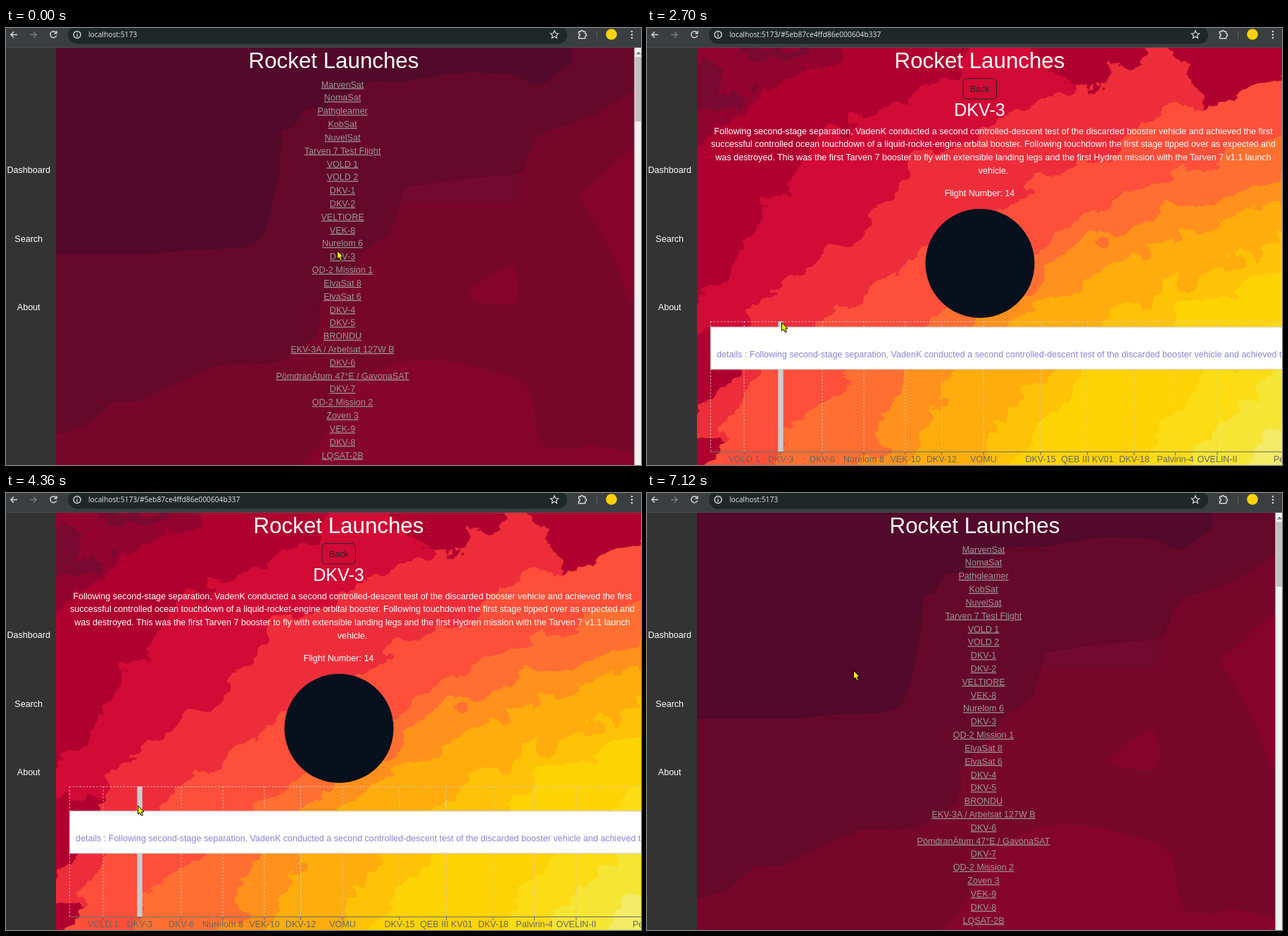
Animation of 902 by 621 pixels, one loop 8 s. Source, as an HTML page:

```html
<!DOCTYPE html>
<html lang="en">
<head>
<meta charset="utf-8">
<title>Rocket Launches</title>
<style>
html, body { margin: 0; width: 100%; height: 100%; overflow: hidden; background: #333; }
svg { display: block; }
text { font: 12.55px "Liberation Sans", Arial, sans-serif; fill: #fff; white-space: pre; }
.mid { text-anchor: middle; }
.h1 { font-size: 31.3px; }
.h2 { font-size: 25.1px; }
.url { font-family: "Open Sans", "Noto Sans", sans-serif; font-size: 10.25px; fill: #e6e8e8; }
.link { fill: #999; text-decoration: underline; }
.link.hot { fill: #c8c8c8; }
.nav.hot { text-decoration: underline; }
.tick { fill: #666; }
.tip { fill: #8884d8; }
.icon { fill: none; stroke: #d5d9da; stroke-width: 1.4; }
.grid { fill: none; stroke: #ccc; stroke-dasharray: 2.4 2.4; stroke-width: .9; }
.ptr { fill: #ff0; stroke: #000; stroke-width: 1; stroke-linejoin: round; }
</style>
</head>
<body>
<svg width="902" height="621" viewBox="0 0 902 621">
  <defs>
    <clipPath id="view"><rect x="71" y="28" width="831" height="593"/></clipPath>
    <filter id="rough" filterUnits="userSpaceOnUse" x="10" y="-40" width="960" height="730" color-interpolation-filters="sRGB">
      <feTurbulence type="fractalNoise" baseFrequency=".022 .026" numOctaves="4" seed="7"/>
      <feDisplacementMap in="SourceGraphic" scale="62" xChannelSelector="R" yChannelSelector="G"/>
    </filter>
  </defs>

  <g id="list" clip-path="url(#view)">
    <rect x="71" y="28" width="831" height="593" fill="#650829"/>
    <path fill="#530929" d="M71 28H803V52L785 62 770 75Q755 84 740 76L725 66Q680 62 635 64L560 77 520 76 505 82 470 100 450 113 425 115 407 142 392 146 388 205 376 262 367 292Q358 309 330 313L262 315 205 321H71Z"/>
    <path fill="#76072a" d="M892 88L850 115Q820 134 765 147 751 155 743 180L735 200Q731 208 718 209L650 214 566 227 556 262 547 290 505 320 497 337 467 370 445 392 446 420 438 441 395 470Q387 477 370 477L302 479 240 505 190 530 151 532 120 560Q105 570 71 577V621H892Z"/>
    <path fill="#720a30" d="M566 227L650 215 728 208 722 248H563Z"/>
    <path fill="#84042c" d="M892 171Q870 182 850 206L812 240 830 265 865 330 884 390H892ZM722 336L700 343 668 365 654 380 672 390Q700 396 724 392L729 372ZM418 621L440 600 470 550Q475 515 490 505L550 477Q590 466 640 475L700 490Q738 500 745 515L752 550Q755 592 770 596L810 598 830 591 892 604V621Z"/>
    <text class="mid h1" x="465.5" y="57.3">Rocket Launches</text>
    <g id="links"></g>
    <rect x="892.5" y="28" width="10" height="593" fill="#f1f1f1"/>
    <rect x="893.5" y="41" width="9" height="92" fill="#c1c1c1"/>
    <path d="M895 37.5L898.5 33.5 902 37.5Z" fill="#777"/>
  </g>

  <g id="detail" clip-path="url(#view)">
    <g id="sky" filter="url(#rough)">
      <rect x="10" y="-40" width="960" height="730" fill="#b00030"/>
      <path fill="#92042f" d="M10-40H300L275 50 215 62 170 95 130 130 60 165 10 190Z"/>
      <path fill="#780930" d="M10 45L75 42 98 60 105 80 140 92 138 112 95 116 10 112ZM115 28L235 22 230 36 160 46Z"/>
    </g>
    <text class="mid h1" x="472.5" y="57.3">Rocket Launches</text>
    <rect x="449" y="71.8" width="47.4" height="29" rx="5" fill="none" stroke="#212529"/>
    <text class="mid" x="472.7" y="90.5" style="fill:#212529">Back</text>
    <text class="mid h2" x="472.5" y="125">DKV-3</text>
    <g id="story"></g>
    <text class="mid" x="472.5" y="238.5">Flight Number: 14</text>
    <circle id="badge" cx="473" cy="334.5" r="77.5" fill="#07101c"/>
    <g id="chart">
      <path id="grid" class="grid"/>
      <path id="axis" stroke="#666" fill="none"/>
      <g id="ticks"></g>
      <g id="hover">
        <rect id="bar" y="417" width="7.4" height="185" fill="#ccc"/>
        <g id="box">
          <rect x="90.5" y=".5" width="830" height="60" fill="#fff" stroke="#ccc"/>
          <text id="info" class="tip" x="99" y="43"></text>
        </g>
      </g>
    </g>
  </g>

  <rect y="27" width="71" height="594" fill="#333"/>
  <g id="nav"></g>

  <rect width="902" height="27.5" fill="#3a3e40"/>
  <rect y="27" width="902" height="1" fill="#4a4d4f"/>
  <rect x="88" y="-3" width="709" height="25.5" rx="12.7" fill="#202729"/>
  <path class="icon" d="M16 9.5H7M11 5.2L6.8 9.5 11 13.8"/>
  <path class="icon" style="stroke:#777c7e" d="M34 9.5H43M39 5.2L43.2 9.5 39 13.8"/>
  <path class="icon" d="M71 6.6A4.5 4.5 0 1 0 71.7 10.6M72 4V7.7H68.3"/>
  <circle class="icon" cx="101" cy="9.5" r="5"/>
  <path class="icon" d="M101 8.8V12.4M101 6.4V7.6"/>
  <path class="icon" style="stroke-width:1.2" d="M779 3.8L780.6 7.5 784.6 7.9 781.6 10.5 782.5 14.4 779 12.3 775.5 14.4 776.4 10.5 773.4 7.9 777.4 7.5Z"/>
  <path class="icon" d="M813.5 5.3H816.2A1.8 1.8 0 0 1 819.8 5.3H822.8V8.2A1.8 1.8 0 0 1 822.8 11.8V14.7H813.5V11.8A1.8 1.8 0 0 0 813.5 8.2Z"/>
  <path stroke="#5d6264" d="M839.5 4V15"/>
  <circle cx="860" cy="9" r="7.8" fill="#fcd20c"/>
  <g fill="#d5d9da"><circle cx="889" cy="5" r="1.3"/><circle cx="889" cy="9.5" r="1.3"/><circle cx="889" cy="14" r="1.3"/></g>
  <text id="url" class="url" x="117" y="13.2"></text>

  <g id="cursor">
    <path id="arrow" class="ptr" d="M.5.5V12.6L3.2 10.2 5.2 14.6 7.3 13.7 5.4 9.3 8.9 9Z"/>
    <path id="hand" class="ptr" d="M3 8V1.6Q4 0 5.2 1.6V5.5L9.3 6.6Q10.3 7 10.2 8.4L9.4 12.2 8.6 14.5H4L1 10.4Q0 8.6 1.4 8.2Z"/>
    <g id="beam" fill="none">
      <path d="M-4-6.5H4M0-6.5V6.5M-4 6.5H4" stroke="#000" stroke-width="2.4"/>
      <path d="M-3.5-6.5H3.5M0-6.5V6.5M-3.5 6.5H3.5" stroke="#8a8a10" stroke-width=".8"/>
    </g>
  </g>
</svg>
<script>
const LOOP = 8000;
const $ = id => document.getElementById(id);

function add(parent, tag, attrs, content) {
  const el = document.createElementNS('http://www.w3.org/2000/svg', tag);
  for (const k in attrs) el.setAttribute(k, attrs[k]);
  if (content) el.textContent = content;
  return $(parent).appendChild(el);
}

// Colour bands, each running from the upper right to the lower left
const bands = {
  '#d20a36': '470 -40 440 70 385 88 300 130 225 180 205 215 165 255 130 320 60 400 10 430',
  '#ee2d3a': '730 -40 715 30 640 78 560 105 480 150 390 178 340 240 285 300 205 360 150 405 125 490 10 590',
  '#fd4f3a': '970 30 850 92 770 112 700 135 640 190 590 205 500 260 430 295 330 365 260 395 215 445 165 490 110 570 60 690',
  '#ff6f32': '970 130 800 190 700 230 620 262 560 300 520 350 400 415 330 465 260 525 200 570 150 690',
  '#ff911c': '970 190 850 230 760 248 690 285 600 318 555 370 490 405 430 440 375 480 340 550 280 690',
  '#ffad0c': '970 215 860 258 800 280 720 308 645 350 570 390 510 425 460 460 415 520 360 690',
  '#fec207': '970 265 880 310 800 350 700 390 630 430 570 480 510 550 430 690',
  '#fed304': '970 315 830 375 770 395 720 445 645 475 595 530 540 585 470 690',
  '#fbdc15': '970 385 860 445 800 495 740 555 650 690',
  '#f5e534': '970 440 880 505 830 545 790 590 740 690',
  '#f3ea66': '970 530 865 598 820 690'
};
for (const c in bands) add('sky', 'path', { fill: c, d: `M${bands[c]}H970Z` });

const launches = ['MarvenSat', 'NomaSat', 'Pathgleamer', 'KobSat', 'NuvelSat', 'Tarven 7 Test Flight',
  'VOLD 1', 'VOLD 2', 'DKV-1', 'DKV-2', 'VELTIORE', 'VEK-8', 'Nurelom 6', 'DKV-3', 'QD-2 Mission 1',
  'ElvaSat 8', 'ElvaSat 6', 'DKV-4', 'DKV-5', 'BRONDU', 'EKV-3A / Arbelsat 127W B', 'DKV-6',
  'PömdranÄtum 47°E / GavonaSAT', 'DKV-7', 'QD-2 Mission 2', 'Zoven 3', 'VEK-9', 'DKV-8', 'LQSAT-2B'];
const links = launches.map((name, i) =>
  add('links', 'text', { class: 'mid link', x: 478, y: 84.6 + i * 18.82 }, name));

const story = [
  'Following second-stage separation, VadenK conducted a second controlled-descent test of the discarded booster vehicle and achieved the first',
  'successful controlled ocean touchdown of a liquid-rocket-engine orbital booster. Following touchdown the first stage tipped over as expected and',
  'was destroyed. This was the first Tarven 7 booster to fly with extensible landing legs and the first Hydren mission with the Tarven 7 v1.1 launch',
  'vehicle.'];
story.forEach((line, i) => add('story', 'text', { class: 'mid', x: 492, y: 150.5 + i * 18.82 }, line));

const ticks = [[138, 'VOLD 1'], [190, 'DKV-3'], [249, 'DKV-6'], [308, 'Nurelom 8'], [367, 'VEK-10'],
  [418.5, 'DKV-12'], [478, 'VOMU'], [559, 'DKV-15'], [625.5, 'QEB III KV01'], [692, 'DKV-18'],
  [750.5, 'Palvirin-4'], [810, 'OVELIN-II']];
$('grid').setAttribute('d', 'M90 417.3H910M90 602.3H910M90.3 417V602' +
  ticks.map(([x]) => `M${x} 417V602`).join(''));
$('axis').setAttribute('d', 'M90 602.3H910' + ticks.map(([x]) => `M${x} 602V607`).join(''));
ticks.forEach(([x, name]) => add('ticks', 'text', { class: 'mid tick', x, y: 617 }, name));
add('ticks', 'text', { class: 'tick', x: 890, y: 617 }, 'Pelora');

const nav = ['Dashboard', 'Search', 'About'].map((name, i) =>
  add('nav', 'text', { class: 'mid nav', x: 32.2, y: 206.3 + i * 97.2 }, name));

const details = [story.join(' '),
  'Second GTO launch for Tarven 7. The KDAE evaluated launch data from this flight as part of a separate certification program for VadenK.'];

// time, x, y, pointer
const moves = [
  [0, 470, 316, 'arrow'], [120, 470, 315, 'arrow'], [270, 469, 321, 'hand'], [390, 470, 325, 'hand'],
  [790, 468, 318, 'arrow'], [1030, 460, 297, 'arrow'], [1180, 388, 255, 'arrow'], [1300, 408, 238, 'arrow'],
  [1590, 399, 233, 'arrow'], [1740, 380, 231, 'arrow'], [1860, 256, 271, 'arrow'], [1980, 234, 305, 'arrow'],
  [2100, 216, 340, 'arrow'], [2220, 202, 372, 'arrow'], [2340, 194, 393, 'arrow'], [2460, 190, 404, 'arrow'],
  [2580, 191, 418, 'arrow'], [2820, 190, 422, 'arrow'], [3060, 190, 426, 'arrow'], [3430, 186, 427, 'arrow'],
  [3560, 185, 431, 'arrow'], [3710, 184, 444, 'arrow'], [4360, 187, 444, 'arrow'], [4510, 187, 425, 'arrow']
];
const exits = [
  [4630, 186, 375, 'arrow'], [4750, 185, 310, 'arrow'], [4870, 185, 242, 'arrow'], [5020, 178, 200, 'arrow'],
  [5140, 189, 143, 'beam'], [5290, 183, 150, 'beam'], [5440, 190, 155, 'beam'], [5570, 168, 167, 'beam'],
  [5690, 142, 180, 'beam'], [5840, 107, 187, 'beam'], [6120, 84, 194, 'arrow'], [6260, 55, 196, 'hand'],
  [6430, 47, 197, 'hand'], [6850, 150, 234, 'arrow'], [6970, 289, 250, 'arrow'], [7120, 293, 252, 'arrow']
];
const path = moves.concat(exits);

// time, tooltip top
const tips = [[2580, 425], [2940, 427], [3060, 429], [3180, 431], [3310, 433], [3430, 434], [3560, 435],
  [3710, 441], [3840, 446], [3960, 449], [4090, 451], [4210, 452], [4510, 444]];

const at = (steps, t) => steps.filter(s => s[0] <= t).pop() || steps[0];
const within = (t, a, b) => t >= a && t < b;
const show = (id, on) => { $(id).style.display = on ? '' : 'none'; };

function draw(t) {
  const open = within(t, 670, 6700);
  show('list', !open);
  show('detail', open);
  show('badge', t >= 790);
  show('chart', t >= 790);
  $('url').textContent = 'localhost:5173' + (within(t, 670, 6560) ? '/#5eb87ce4ffd86e000604b337' : '');
  links[13].classList.toggle('hot', within(t, 270, 670));
  nav[0].classList.toggle('hot', within(t, 6430, 6850));

  const second = within(t, 3430, 4360);
  show('hover', within(t, 2580, 4630));
  $('bar').setAttribute('x', second ? 178.8 : 186.2);
  $('info').textContent = 'details : ' + details[+second];
  $('box').setAttribute('transform', `translate(0 ${at(tips, t)[1] - .5})`);

  const [, x, y, kind] = at(path, t);
  for (const id of ['arrow', 'hand', 'beam']) show(id, id === kind);
  $('cursor').setAttribute('transform', `translate(${x} ${y})`);
}

const start = performance.now();
function tick() {
  draw((performance.now() - start) % LOOP);
  requestAnimationFrame(tick);
}
draw(0);
requestAnimationFrame(tick);
</script>
</body>
</html>
```
